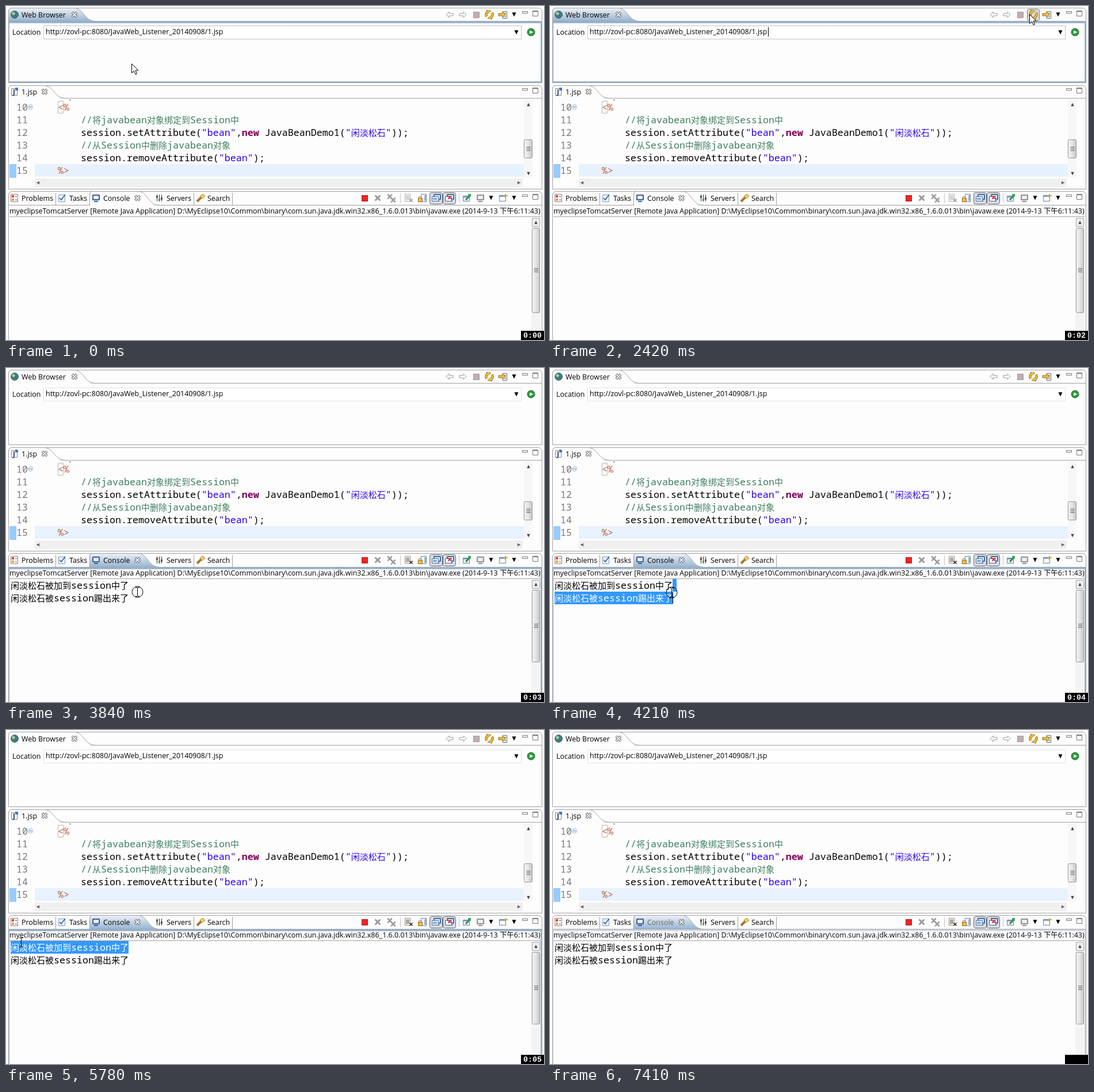
An HTML page with a canvas that plays this animation: 935x581 px, repeating every 7530 ms.

```html
<!DOCTYPE html>
<html lang="zh">
<head>
<meta charset="utf-8">
<style>
html, body { margin: 0; width: 100%; height: 100%; overflow: hidden; background: #fdfdfd; }
canvas { display: block; }
</style>
</head>
<body>
<canvas id="stage" width="935" height="581"></canvas>
<script>
const c = document.getElementById('stage').getContext('2d');
const LOOP = 7530, TICK = 128.75, SECOND = 1030;
const PAPER = '#fdfdfd', LINE = '#a0a0a0', BLUE = '#99b4d1', SELECT = '#3399ff';
const STEEL = '#3c5f91', GOLD = '#f0c23c', BRONZE = '#8a6a1c';
const UI = '12.45px "Open Sans", "Noto Sans", "Noto Sans CJK SC", sans-serif';
const MONO = '16.67px "Noto Sans Mono", monospace';
const HAN = '15px "Noto Sans CJK SC", "Noto Sans CJK", sans-serif';
const NICK = '闲淡松石';

// What the user does, in ms.
const HOVER = 1690, OUTPUT = 2570, LEAVE = 3210, FOCUS = 3840, SELECT_ALL = 4210;
const DRAG = 4360, DRAGGED = 4930, RELEASE = 5780, CLICK = 6450, DONE = 6720, FADE = 7410;

// Pointer strokes: when each one starts and ends, and where it arrives.
const HOME = [218, 100];
const STROKES = [
  { from: 0, to: 400, x: 859, y: 342 },
  { from: 400, to: 800, x: 795, y: 85 },
  { from: 1030, to: 1330, x: 903, y: 36 },
  { from: 1330, to: HOVER, x: 833, y: 14 },
  { from: 2690, to: 3600, x: 228, y: 389 },
  { from: 3720, to: 4100, x: 211, y: 390 },
  { from: DRAG, to: DRAGGED, x: 20, y: 364 },
  { from: 5400, to: 5660, x: 26, y: 369 },
  { from: RELEASE, to: 6060, x: 441, y: 490 },
  { from: CLICK, to: 6840, x: 600, y: 510 }
];

const within = (t, a, b) => t >= a && t < b;

function pointerAt(t) {
  const tick = Math.floor(t / TICK + 1e-6) * TICK;
  let [x, y] = HOME;
  for (const s of STROKES) {
    const p = Math.min(1, Math.max(0, (tick - s.from) / (s.to - s.from)));
    const e = p * p * (3 - 2 * p);
    x += (s.x - x) * e;
    y += (s.y - y) * e;
  }
  return [Math.round(x), Math.round(y)];
}

function box(x, y, w, h, color) {
  c.fillStyle = color;
  c.fillRect(x, y, w, h);
}

function paint(fill, stroke, width = 1) {
  if (fill) { c.fillStyle = fill; c.fill(); }
  if (stroke) { c.strokeStyle = stroke; c.lineWidth = width; c.stroke(); }
}

function frame(x, y, w, h, stroke, fill, radius = 0) {
  c.beginPath();
  c.roundRect(x + .5, y + .5, w - 1, h - 1, radius);
  paint(fill, stroke);
}

function poly(points, fill, stroke, width) {
  c.beginPath();
  points.forEach(([x, y], i) => i ? c.lineTo(x, y) : c.moveTo(x, y));
  if (fill) c.closePath();
  paint(fill, stroke, width);
}

function disc(x, y, r, fill, stroke) {
  c.beginPath();
  c.arc(x, y, r, 0, 7);
  paint(fill, stroke);
}

function gradient(x0, y0, x1, y1, ...colors) {
  const g = c.createLinearGradient(x0, y0, x1, y1);
  colors.forEach((color, i) => g.addColorStop(i / (colors.length - 1), color));
  return g;
}

// Both text helpers return the x where the text ends.
function label(text, x, y, color = '#000') {
  c.font = UI;
  c.fillStyle = color;
  c.fillText(text, x, y);
  return x + c.measureText(text).width;
}

function code(text, x, y, color = '#000', weight = '') {
  c.fillStyle = color;
  for (const part of text.match(/[\u4e00-\u9fff]+|[^\u4e00-\u9fff]+/g)) {
    c.font = weight + (part.charCodeAt(0) > 0x4dff ? HAN : MONO);
    c.fillText(part, x, y);
    x += c.measureText(part).width;
  }
  return x;
}

function triangle(x, y, r, angle, color = '#000') {
  const corner = a => [x + r * Math.cos(a), y + r * Math.sin(a)];
  poly([0, 2.25, -2.25].map(a => corner(angle + a)), color);
}

const UP = -Math.PI / 2, DOWN = Math.PI / 2;
const dropDown = (x, y) => triangle(x, y - 1, 4.5, DOWN);

function windowButtons(y) {
  frame(897, y + 1, 10, 4, '#777', '#fff');
  frame(915, y, 10, 10, '#777', '#fff');
  box(915, y + 1, 10, 1, '#777');
}

function cross(x, y, r, color, width) {
  for (const k of [-1, 1]) poly([[x - r, y - r * k], [x + r, y + r * k]], null, color, width);
}

function closeMark(x, y) {
  cross(x, y, 4, '#666', 4);
  cross(x, y, 3.6, '#fff', 2);
}

// Outline of a view; the focused one gets a thick coloured border.
function panel(y, bottom, strip, focus) {
  const top = y + strip;
  box(4, top, 927, 1, LINE);
  if (focus) {
    box(4, top + 1, 927, 3, focus);
    box(4, bottom - 2, 927, 3, focus);
    for (const x of [4, 929]) box(x, top, 2, bottom - top, focus);
  }
  c.beginPath();
  c.roundRect(4.5, y + .5, 927, bottom - y, [6, 6, 0, 0]);
  paint(null, LINE);
}

function tab(x0, x1, y, h, focused) {
  if (!focused) box(x0 + 1, y + h, x1 + 26 - x0, 1, PAPER);
  c.beginPath();
  c.moveTo(x0 + .5, y + h);
  c.lineTo(x0 + .5, y + 6);
  c.quadraticCurveTo(x0 + .5, y + .5, x0 + 6, y + .5);
  c.lineTo(x1, y + .5);
  c.bezierCurveTo(x1 + 18, y + .5, x1 + 17, y + h + .5, x1 + 38, y + h + .5);
  paint(focused ? gradient(0, y, 0, y + h, '#eef3f9', BLUE) : PAPER, LINE);
}

function thumb(x, y, w, h) {
  frame(x, y, w, h, '#959595', gradient(x, 0, x + w, 0, '#f5f5f5', '#e4e4e4', '#c4c4c4'), 2);
  for (let i = -4; i <= 2; i += 3) box(x + w / 2 - 3, Math.round(y + h / 2) + i, 7, 1, '#555');
}

function monitor(x, y, color) {
  frame(x, y, 13, 10, color, '#e8eef6');
  frame(x + 1, y + 1, 11, 8, color);
  box(x + 3, y + 11, 7, 2, color);
}

// dir is -1 for left and 1 for right.
function arrowIcon(x, y, dir, stroke, fill) {
  const half = [[6, 0], [1, -5], [1, -2], [-6, -2]];
  const other = half.slice(1).reverse().map(([a, b]) => [a, -b]);
  poly([...half, ...other, half[0]].map(([a, b]) => [x + a * dir, y + b]), fill, stroke);
}

function refreshIcon(x, y) {
  for (const turn of [2.5, 2.5 + Math.PI]) {
    for (const [color, width, r] of [[BRONZE, 4.5, 5], [GOLD, 2.5, 3.5]]) {
      c.beginPath();
      c.arc(x, y, 5.5, turn, turn + 1.9);
      paint(null, color, width);
      const end = turn + 2;
      triangle(x + 5.5 * Math.cos(end), y + 5.5 * Math.sin(end), r, end + DOWN, color);
    }
  }
}

function browser(t) {
  const focused = t < FOCUS;
  panel(3, 133, 23, focused && BLUE);
  tab(4, 118, 3, 23, focused);
  disc(15, 15, 6.5, '#3d7d78', '#45648b');
  disc(13, 13, 2.6, '#a8d29a');
  label('Web Browser', 27, 20);
  closeMark(119, 15);

  arrowIcon(771, 15, -1, '#999', '#fff');
  arrowIcon(794, 15, 1, '#999', '#fff');
  frame(812, 10, 11, 11, '#999', '#c3adb3');
  if (within(t, HOVER, LEAVE)) frame(829, 5, 22, 21, '#777', '#dcdcdc', 3);
  refreshIcon(840, 15);
  frame(863, 9, 8, 13, '#666', '#fff');
  for (let y = 12; y < 21; y += 3) box(866, y, 3, 1, '#456fa5');
  arrowIcon(862, 15, 1, BRONZE, GOLD);
  dropDown(883, 15);
  windowButtons(8);

  label('Location', 11, 50);
  frame(65, 34, 831, 24, focused ? '#c4c4c4' : '#e1e1e1', '#fff');
  label('http://zovl-pc:8080/JavaWeb_Listener_20140908/1.jsp', 69, 49);
  const blink = Math.floor((t - 120) / 530) % 2 === 0;
  if (focused && t >= 120 && blink) box(379, 37, 1, 16, '#000');
  dropDown(887, 46);
  disc(912.5, 45.5, 6.5, '#2f9d3f', '#1d6e2c');
  triangle(912.5, 45.5, 3.8, 0, '#fff');
}

const TAG = '#bf5f3f', NOTE = '#3f7f5f', STR = '#2a00ff', KEY = '#7f0055';
const SOURCE = [
  [90, ['<%', TAG]],
  [130, ['//将javabean对象绑定到Session中', NOTE]],
  [130, ['session.setAttribute('], ['"bean"', STR], [','], ['new', KEY, 'bold '],
    [' JavaBeanDemo1('], [`"${NICK}"`, STR], ['));']],
  [130, ['//从Session中删除javabean对象', NOTE]],
  [130, ['session.removeAttribute('], ['"bean"', STR], [');']],
  [90, ['%>', TAG]]
];

function editor() {
  panel(138, 318, 22);
  tab(4, 66, 138, 22);
  frame(9, 143, 11, 13, '#888', '#fff');
  c.font = 'bold 12px "Open Sans", sans-serif';
  c.fillStyle = '#23406f';
  c.fillText('J', 12, 154);
  box(16, 142, 5, 5, '#4d79b8');
  label('1.jsp', 27, 154);
  closeMark(67, 149);
  windowButtons(142);

  box(50, 275, 850, 22, '#e8f2fe');
  for (let y = 275; y < 299; y++)
    for (let x = 6 + y % 2; x < 18; x += 2) box(x, y, 1, 1, SELECT);
  box(110, 163, 3, 1, '#555');
  disc(42.5, 175.5, 4, '#eef4fb', '#9eb6d3');
  box(40, 175, 5, 1, '#6485ad');
  frame(90, 165, 10, 22, '#b8b8b8');

  SOURCE.forEach(([x, ...runs], i) => {
    const y = 182 + i * 22;
    code(String(10 + i), 18, y, '#787878');
    for (const [text, color, weight] of runs) x = code(text, x, y, color, weight);
  });

  box(900, 163, 15, 135, '#f7f7f7');
  triangle(908, 172, 3.5, UP, '#444');
  triangle(908, 291, 3.5, DOWN, '#444');
  thumb(900, 232, 15, 33);
  box(50, 300, 848, 15, '#f0f0f0');
  triangle(56, 307.5, 3.5, Math.PI, '#666');
  triangle(891, 307.5, 3.5, 0, '#666');
}

const ICONS = {
  Problems(x, y) {
    frame(x, y, 13, 14, '#a77', '#fff');
    box(x + 2, y + 2, 4, 4, '#d0413d');
    box(x + 2, y + 8, 4, 4, '#d9a53a');
    for (const dy of [4, 10]) box(x + 8, y + dy, 3, 1, '#557');
  },
  Tasks(x, y) {
    frame(x, y + 1, 12, 13, '#7f9cc0', '#eaf2fb');
    poly([[x + 2, y + 7], [x + 5, y + 10], [x + 12, y + 1]], null, '#2362a3', 1.6);
  },
  Console(x, y) {
    monitor(x, y + 1, STEEL);
  },
  Servers(x, y) {
    for (let i = 0; i < 3; i++) {
      box(x + 2 + i * 4, y + 1, 1, 12, '#333');
      box(x + 1 + i * 4, y + 3 + i * 5 % 7, 3, 4, i === 1 ? '#4da34d' : '#555');
    }
  },
  Search(x, y) {
    poly([[x + 1, y + 13], [x + 8, y + 6]], null, '#a8742c', 4);
    poly([[x + 6, y + 4], [x + 11, y], [x + 15, y + 4], [x + 10, y + 8]], '#f2cf72', '#a8822f');
  }
};

function consoleTabs(focused, ink) {
  let x = 3;
  for (const [name, icon] of Object.entries(ICONS)) {
    const current = name === 'Console';
    if (current) tab(x, x + 84, 322, 24, focused);
    icon(x + 5, 327);
    const end = label(name, x + 24, 339, current ? ink : '#000');
    if (current) closeMark(end + 13, 334);
    x = Math.round(end) + (current ? 39 : 4);
    if (!current) box(x, 325, 1, 21, LINE);
  }
}

function consoleTools(hasOutput) {
  frame(618, 329, 11, 11, '#b02020', '#ee2525');
  cross(646, 334, 4.5, '#999', 3);
  for (const d of [-3, 3]) cross(670 + d, 334.5 + d, 3.8, '#999', 2.5);
  for (const x of [685, 787]) box(x, 326, 1, 17, '#c4c4c4');

  frame(693, 327, 10, 13, hasOutput ? '#a98b45' : '#aaa', '#fff');
  for (let y = 330; y < 338; y += 2) box(695, y, 6, 1, hasOutput ? '#465b78' : '#aaa');
  cross(704, 338, 2.5, hasOutput ? '#333' : '#999', 1.7);

  frame(721, 327, 10, 14, '#7088aa', '#fff');
  box(727, 329, 3, 10, '#9bb4d4');
  disc(719.5, 334, 2.5, null, BRONZE);
  frame(716, 334, 8, 7, BRONZE, GOLD);

  for (const x of [736, 759]) {
    frame(x, 324, 23, 21, '#666', '#d9dde3', 3);
    monitor(x + 7, 327, '#3f6ca8');
    frame(x + 4, 331, 12, 9, '#3f6ca8', '#f2f6fb');
  }
  for (const y of [334, 336]) box(742, y, 7, 1, '#3f6ca8');
  cross(771, 333, 2.5, '#d92d2d', 1.8);

  frame(794, 330, 12, 10, '#5f82ac', '#edf4fc');
  box(795, 331, 10, 2, '#7fa3cc');
  poly([[799, 337], [806, 330]], null, '#2e8a49', 3);
  box(803, 327, 5, 5, '#3aa35a');
  monitor(818, 328, '#909090');
  frame(857, 329, 12, 11, '#5f82ac', '#fff');
  box(858, 330, 10, 2, '#7fa3cc');
  box(867, 327, 2, 7, '#d6a22b');
  box(865, 329, 7, 2, '#d6a22b');
  for (const x of [843, 883]) dropDown(x, 334);
  windowButtons(327);
}

// Selected areas of the output as [x, y, w, h].
function selection(t) {
  if (within(t, SELECT_ALL, DRAG)) return [[213, 367, 7, 22], [8, 389, 205, 22]];
  if (!within(t, DRAG, CLICK)) return [];
  const column = t < DRAGGED ? Math.floor((pointerAt(t)[0] - 8) / 15) : 0;
  const x = 8 + 15 * Math.max(0, column);
  return [[x, 367, Math.max(0, 213 - x), 22]];
}

function output(t) {
  const lines = color => {
    code(NICK + '被加到session中了', 8, 384, color);
    code(NICK + '被session踢出来了', 8, 406, color);
  };
  lines('#000');
  for (const area of selection(t)) {
    c.save();
    c.beginPath();
    c.rect(...area);
    c.clip();
    box(...area, SELECT);
    lines('#fff');
    c.restore();
  }
  if (within(t, SELECT_ALL, DRAG)) box(213, 390, 1, 20, '#000');
  if (within(t, CLICK, DONE)) box(8, 411, 1, 21, '#000');
}

function consoleView(t) {
  const hasOutput = t >= OUTPUT, focused = t >= FOCUS, faded = t >= FADE;
  panel(322, 590, 24, focused && (faded ? '#d3dae2' : BLUE));
  consoleTabs(focused, faded ? '#666' : '#000');
  consoleTools(hasOutput);
  label('myeclipseTomcatServer [Remote Java Application] D:\\MyEclipse10\\Common\\binary\\com.sun.java.jdk.win32.x86_1.6.0.013\\bin\\javaw.exe (2014-9-13 下午6:11:43)', 6, 361);
  box(6, 366, 923, 1, LINE);
  if (hasOutput) output(t);

  box(913, 368, 16, 213, '#f4f4f4');
  frame(914, 369, 14, 15, '#aaa', '#f0f0f0');
  triangle(921, 377, 3.5, UP, '#444');
  thumb(914, 386, 14, hasOutput ? 126 : 148);
}

function pointer(t) {
  if (t >= FADE) return;
  const [x, y] = pointerAt(t);
  if (t < FOCUS && y < 367) {
    const tip = [[0, 0], [0, 16], [4, 12.5], [6.5, 18.5], [9, 17.5], [6.5, 11.5], [11.5, 11.5]];
    poly(tip.map(([a, b]) => [x + a + .5, y + b + .5]), '#fff', '#000');
    return;
  }
  box(x, y - 7, 1, 15, '#000');
  for (const dy of [-8, 8])
    for (const dx of [-3, 1]) box(x + dx, y + dy, 3, 1, '#000');
  const held = within(t, FOCUS, RELEASE) || within(t, CLICK, DONE);
  if (held) disc(x + .5, y + .5, 9.5, null, '#000');
}

function clock(t) {
  box(895, 565, 40, 16, '#000');
  if (t >= FADE) return;
  c.font = 'bold 13.3px "Liberation Mono", monospace';
  c.fillStyle = '#fff';
  c.fillText('0:0' + Math.floor(t / SECOND), 899, 577);
}

const start = performance.now();

function draw() {
  const t = (performance.now() - start) % LOOP;
  box(0, 0, 935, 581, PAPER);
  browser(t);
  editor();
  consoleView(t);
  pointer(t);
  clock(t);
  requestAnimationFrame(draw);
}

draw();
</script>
</body>
</html>
```
